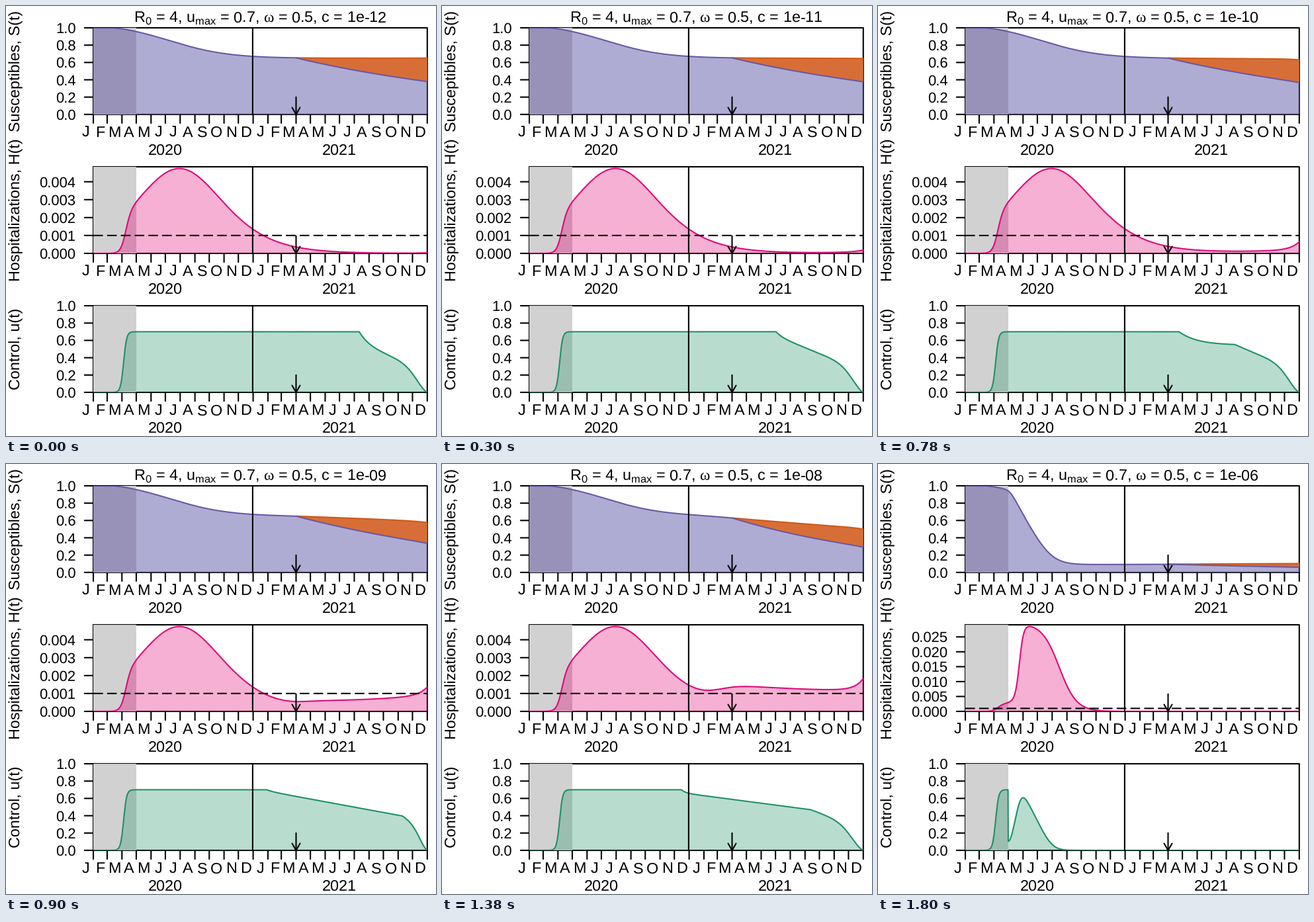
These frames come from a looping animation (650 px wide and 650 px high, 2.1 s). A matplotlib script:

```python
import numpy as np
import matplotlib.pyplot as plt
from matplotlib.animation import FuncAnimation
from matplotlib.patches import Polygon, Rectangle

plt.rcParams.update({
    "font.family": "Liberation Sans", "text.hinting": "none", "path.snap": False,
    "mathtext.fontset": "custom", "mathtext.it": "Liberation Serif",
})

PX = 0.72                        # points per pixel at 100 dpi
LEFT, RIGHT, HEIGHT = 132.0, 636.8, 130.87
TOPS = (33.0, 243.07, 453.13)
LINE, TICK = 2.08, 13.2
SMALL, LARGE = 22.0, 23.33
DAYS = 700
LOCK, NEW_YEAR, VACCINE = 90, 334, 425

BLACK, GREY = "#000000", "#d1d1d1"
ORANGE, ORANGE_LINE = "#d86e37", "#cf5a17"
# line, translucent fill, fill inside the grey period
PURPLE = ("#6a58a4", ("#7570b3", .575), "#9892b8")
PINK = ("#df0a7c", ("#e7298a", .37), "#d68bb3")
GREEN = ("#1f9069", ("#28986e", .33), "#9bbeb0")


def px(day):
    return LEFT + (RIGHT - LEFT) * day / DAYS


# Half-day grid, running past the right edge by the hospital delay
STEP, DELAY = .5, 40
N = int(DAYS / STEP) + 1
X = px(np.arange(N + DELAY) * STEP)
XS = X[:N]
X_LOCK, X_VAC = px(LOCK), px(VACCINE)
MONTHS = [31, 29, 31, 30, 31, 30, 31, 31, 30, 31, 30, 31,
          31, 28, 31, 30, 31, 30, 31, 31, 30, 31, 30, 31]
EDGES = np.cumsum([-31] + MONTHS)

# Hospitalizations late in the run: level, growth, onset, final spike
TAILS = [(0, 0, 0, .035), (.1, .02, 0, .08), (.2, .009, 0, .45),
         (.88, .00345, 443, .48), (1.16, -.0005, 416, .68)]
# Control: end of plateau, level and slope after it, decay, pace of the last drop
RELEASES = [(534, 1, 0, 14, 1), (505, 1, 0, 9, 1), (455, .545, 0, 28, 1),
            (394, .685, .0014, 10, 1.35), (362, .665, .001, 6, .92)]
H_STEP = [1, 1, 1, 1, 1, 2, 5]


def sigmoid(x, mid, width):
    return 1 / (1 + np.exp(-(x - mid) / width))


def bell(x, mid, width):
    return np.exp(-((x - mid) / width) ** 2)


def ramp_down(x, end, width, slope):
    """Straight fall that eases into zero around x = end."""
    return slope * width * np.logaddexp(0, (end - x) / width)


def hospital(i):
    """Hospitalizations in thousandths."""
    wave = 4.74 / np.cosh((X - 262) / 89.7) ** 2 * sigmoid(X, 180.3, 4)
    if i < 5:
        level, growth, onset, spike = TAILS[i]
        q = RIGHT - X
        return (wave + level * np.exp(-growth * q) * sigmoid(X, onset, 18)
                + spike * np.exp(-q / 13))
    if i == 5:
        rebound = ((4.7 + 3.4 * bell(X, 275, 66)) * sigmoid(-X, -450, 26)
                   + 3.45 * bell(X, 230, 21))
        mix = sigmoid(X, 208.7, 3.2)
    else:
        rebound = 29.6 * sigmoid(-X, -274, 13)
        mix = sigmoid(X, 213.9, 3.2)
    return wave + (rebound - wave) * mix


def susceptible(hosp):
    """Infections precede hospital stays; births refill slowly."""
    lost = np.cumsum(hosp)[DELAY:] * STEP * .35e-3
    return 1 - lost + np.cumsum(lost) * STEP * 3e-5


def final_drop(x, pace):
    q = np.maximum(RIGHT - x, 0) * pace
    return .0031 * q + .243 * (1 - np.exp(-(q / 23.6) ** 1.8))


def control(i):
    rise = .7 * sigmoid(XS, 177.8, 2.3)
    if i < 5:
        start, level, slope, decay, pace = RELEASES[i]

        def path(x):
            return np.minimum(level - slope * (x - start), final_drop(x, pace))

        after = np.maximum(XS - start, 0)
        fall = path(XS) + (.7 - path(start)) * np.exp(-after / decay)
        return np.where(XS < start, rise, fall)
    if i == 5:
        back = .7 - .305 * bell(XS, X_LOCK, 12.5)
        ease = .54 + .16 * np.exp(-(XS - 245) / 27)
        later = np.minimum(np.minimum(back, ease), ramp_down(XS, 439, 14, .0041))
    else:
        back = .7 - .595 * bell(XS, X_LOCK, 14.2)
        fall = ramp_down(XS, 262, 7, .016)
        later = -np.logaddexp(-12 * back, -12 * fall) / 12
    return np.where(XS < X_LOCK, rise, np.maximum(later, 0))


fig = plt.figure(figsize=(6.5, 6.5), dpi=100, facecolor="white")
ax = fig.add_axes([0, 0, 1, 1])


def stroke(x, y, color=BLACK, clip=None, **kw):
    line, = ax.plot(x, y, color=color, lw=LINE * PX, solid_capstyle="round",
                    solid_joinstyle="round", **kw)
    if clip is not None:
        line.set_clip_path(clip)


def label(x, y, text, size, ha="center", **kw):
    ax.text(x, y, text, fontsize=size * PX, ha=ha, va="baseline", **kw)


def area(x, low, high, color):
    pts = np.r_[np.c_[x, high], np.c_[x, low][::-1]]
    ax.add_patch(Polygon(pts, closed=True, fc=color, ec="none", lw=0))


class Panel:
    def __init__(self, row, title, ymax, ticks, form):
        self.top, self.base, self.ymax = TOPS[row], TOPS[row] + HEIGHT, ymax
        self.box = Rectangle((LEFT, self.top), RIGHT - LEFT, HEIGHT,
                             fc="none", ec="none")
        ax.add_patch(self.box)
        self.axes(title, ticks, form)
        ax.add_patch(Rectangle((LEFT, self.top), X_LOCK - LEFT, HEIGHT,
                               fc=GREY, ec="none", lw=0, zorder=3))

    def y(self, value):
        return self.base - HEIGHT * np.asarray(value) / self.ymax

    def axes(self, title, ticks, form):
        t, b = self.top, self.base
        stroke([LEFT, RIGHT, RIGHT, LEFT, LEFT], [t, t, b, b, t])
        for v in ticks:
            y = float(self.y(v))
            stroke([LEFT - TICK, LEFT], [y, y])
            label(LEFT - 2 * TICK, y + 7.8, form(v), SMALL, ha="right")
        for day in EDGES[1:]:
            stroke([px(day)] * 2, [b, b + TICK])
        for a, z, name in zip(EDGES, EDGES[1:], "JFMAMJJASOND" * 2):
            label(px((a + z) / 2), b + 34.3, name, LARGE)
        for day, year in ((151, "2020"), (516, "2021")):
            label(px(day), b + 60.7, year, LARGE)
        label(21.1, (t + b) / 2, title, LARGE,
              rotation=90, rotation_mode="anchor")

    def fill(self, values, colors):
        y, base = self.y(values), np.full(N, self.base)
        early = XS <= X_LOCK
        for part, color in ((early, colors[2]), (XS >= X_LOCK - .2, colors[1])):
            pts = np.r_[np.c_[XS, y][part], np.c_[XS, base][part][::-1]]
            ax.add_patch(Polygon(pts, closed=True, fc=color, ec="none",
                                 lw=0, zorder=4))

    def between(self, low, high, part, color):
        pts = np.r_[np.c_[XS, self.y(high)][part],
                    np.c_[XS, self.y(low)][part][::-1]]
        ax.add_patch(Polygon(pts, closed=True, fc=color, ec="none",
                             lw=0, zorder=4))

    def curve(self, values, color, start=0):
        stroke(XS[start:], self.y(values)[start:], color, clip=self.box, zorder=5)

    def marks(self):
        stroke([px(NEW_YEAR)] * 2, [self.top, self.base], zorder=6)
        stroke([X_VAC] * 2, [self.base - .2 * HEIGHT, self.base], zorder=6)
        stroke([X_VAC - 6, X_VAC, X_VAC + 6],
               [self.base - 10.4, self.base, self.base - 10.4], zorder=6)


def draw(i):
    ax.clear()
    ax.set(xlim=(0, 650), ylim=(650, 0))
    ax.axis("off")
    fifths = np.arange(6) / 5
    hosp = hospital(i)

    p = Panel(0, "Susceptibles, S(t)", 1, fifths, "{:.1f}".format)
    free = susceptible(hosp)
    late = XS >= X_VAC
    vaccinated = free * np.exp(-.00272 * np.maximum(XS - X_VAC, 0))
    p.fill(vaccinated, PURPLE)
    p.between(vaccinated, free, late, ORANGE)
    p.curve(free, ORANGE_LINE, start=int(np.argmax(late)))
    p.curve(vaccinated, PURPLE[0])
    p.marks()

    hosp = hosp[:N]
    ymax = 1.02 * hosp.max()
    p = Panel(1, "Hospitalizations, H(t)", ymax, np.arange(0, ymax, H_STEP[i]),
              lambda v: f"{v / 1000:.3f}")
    p.fill(hosp, PINK)
    p.curve(hosp, PINK[0])
    stroke([LEFT, RIGHT], [float(p.y(1))] * 2, clip=p.box,
           dashes=(7, 3), zorder=6)
    p.marks()

    p = Panel(2, "Control, u(t)", 1, fifths, "{:.1f}".format)
    u = control(i)
    p.fill(u, GREEN)
    p.curve(u, GREEN[0])
    p.marks()

    label((LEFT + RIGHT) / 2, 24.3,
          r"$\mathregular{R_0}$ = 4, $\mathregular{u_{max}}$ = 0.7, "
          rf"$\omega$ = 0.5, c = 1e-{12 - i:02d}", LARGE)
    return []


anim = FuncAnimation(fig, draw, frames=7, interval=300, repeat=True,
                     repeat_delay=0, blit=False)
plt.show()
```
